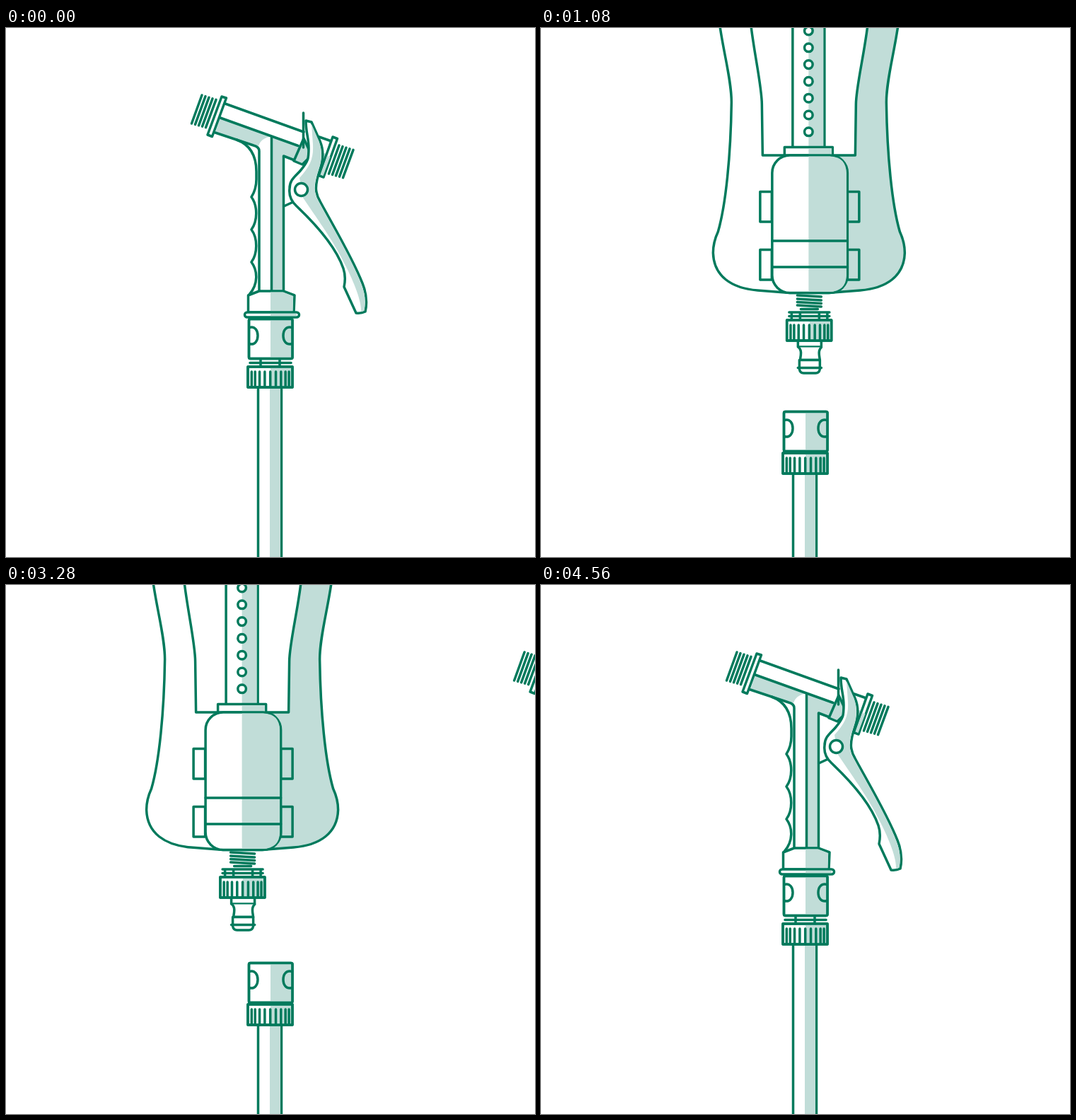
Write an HTML page that moves like this. It is 748 px wide and 748 px high and loops after 4760 ms.

```html
<!DOCTYPE html>
<html lang="en">
<head>
<meta charset="utf-8">
<title>Hose connector</title>
<style>
  html, body { margin: 0; width: 100%; height: 100%; overflow: hidden; background: #fff; }
  svg { display: block; width: 100vw; height: 100vh; }
  path, rect, circle { fill: none; stroke: #007a5c; stroke-width: 3.5; stroke-linecap: round; stroke-linejoin: round; }
  .white { fill: #fff; }
  .tint { fill: #c1ddd8; stroke: none; }
  .shaded { fill: #c1ddd8; }
</style>
</head>
<body>
<svg viewBox="0 0 748 748">
  <defs>
    <g id="plug">
      <path class="white" d="M357 409H390V418.500H357Z"/>
      <path class="white" d="M358 419Q362 423 361 430L360 437H388L387 430Q386 423 390 419"/>
      <path class="white" d="M359 437H388V450Q387 455.500 382 455.500H365Q360 455.500 359 450Z"/>
      <path d="M357 448H390" stroke-width="5"/>
    </g>
    <g id="nut">
      <rect class="white" x="342" y="479" width="63" height="29"/>
      <path class="tint" d="M374 480.500H403V506.500H374Z"/>
      <path class="teeth"/>
      <rect x="342" y="479" width="63" height="29"/>
    </g>
  </defs>

  <g id="sprinkler">
    <path class="tint" d="M498 0C492 40 482 75 482 105C483 180 490 250 501 288Q508 303 508 318C507 351 482 368 445 371L400 375H372V180H438L439 108C440 85 450 40 455 0Z"/>
    <path d="M247 0C253 40 263 75 263 105C262 180 255 250 244 288Q237 303 237 318C238 351 263 368 300 371L345 374.500H400L445 371C482 368 507 351 508 318Q508 303 501 288C490 250 483 180 482 105C482 75 492 40 498 0"/>
    <path d="M291 0C296 40 306 85 306 108L307 180H438L439 108C439 85 450 40 455 0"/>
    <path class="white" d="M349.500 -5H394.500V170H349.500Z"/>
    <path class="tint" d="M372 -5H393V170H372Z"/>
    <g id="holes"></g>
    <path class="white" d="M338 168.500H406V180H338Z"/>
    <path class="tint" d="M372 170H404.500V180H372Z"/>
    <path class="white" d="M303.500 231.500H320V274H303.500ZM303.500 313.500H320V356H303.500Z"/>
    <path class="shaded" d="M427 231.500H443.500V274H427ZM427 313.500H443.500V356H427Z"/>
    <rect class="white" x="320.500" y="180" width="106.500" height="194.500" rx="25"/>
    <path class="tint" d="M372 181.500H402Q425 182 425.500 205V350Q425 372 402 373H372Z"/>
    <path d="M320.500 301H427M320.500 338H427"/>
    <path d="M356 378L390 380M356 383L390 385M356 387.500L390 389.500M356 392L390 394M361 397.500H385" stroke-width="3.200"/>
    <path d="M344.500 402H401.500M344.500 407.500H401.500M348 402V412M360 402V412M387 402V412M398.500 402V412" stroke-width="3"/>
    <use href="#plug" y="32.500"/>
    <use href="#nut" x="-.7" y="-66"/>
  </g>

  <g id="gun">
    <path class="tint" d="M303 127L416 168L407 188L392 181V372H375V153Q360 156 357 167L296 148Z"/>
    <path d="M310 107L421 147M303 127L413 166.500M296 148L350 166Q358 168 358 174V372M375.500 153V372M392.500 372V181L408 187"/>
    <path d="M326 158C348 166 354 185 354 203V214C354 224 352 231 347 239C356 251 356 273 347 285C356 297 356 319 347 331C356 343 357 362 344 377"/>
    <path class="white" d="M305 97L311.500 99L291.500 153.500L285 151Z"/>
    <path class="threads" transform="translate(277 95)"/>
    <path class="threads" transform="translate(471 166)"/>
    <path class="white" d="M440 153L460 160L444 209L434 205Z"/>
    <path class="tint" d="M446 176L454 178L444 208L434 205Z"/>
    <path class="shaded" d="M421 156L407 188L419 193L432 180Z"/>
    <path class="white" d="M462 154L468.500 156.500L449 211L442.500 208.500Z"/>
    <path class="tint" d="M454 181L458.500 182L448.500 209L444.500 207.500Z"/>
    <path d="M393 252L406 246"/>
    <path class="white" d="M424 131L432 133L444 160C449 172 449 186 444 200C440 212 437 224 439 232C440 238 441 240 444 245C460 275 490 325 504 361C510 376 511 388 508 401Q502 404 495 403L478 366Q481 352 477 340C465 305 430 270 411 252C402 244 400 235 401 227C401 215 408 211 416 202C428 188 428 184 428 170C428 155 424 148 424 131Z"/>
    <path class="tint" d="M432 136L442.500 160C447 172 447 186 442 200C438 212 435 224 437 232C438 238 439 240 442 245C458 275 488 325 502 361C508 376 509 388 506 400L502 401C503 385 490 355 478 332C465 305 447 280 420 240L415 212C430 195 435 185 434 165Z"/>
    <path d="M420.500 120V169" stroke-width="5"/>
    <circle class="white" cx="417.500" cy="228.500" r="9"/>
    <path class="white" d="M342.500 402V378L358 372H392L408 378L407 402Z"/>
    <path class="tint" d="M374 373.500H392L406 379L405.500 401H374Z"/>
    <use href="#plug"/>
    <rect class="white" x="337.500" y="402" width="77" height="7" rx="3.500"/>
    <path class="tint" d="M374 403.700H411V407.300H374Z"/>
  </g>

  <g id="connector">
    <path class="white" d="M356.500 508H389.500V900H356.500Z"/>
    <path class="tint" d="M373 509H388V900H373Z"/>
    <path class="white" d="M360 460H387V479H360Z"/>
    <path d="M345 473.500H403"/>
    <use href="#nut"/>
    <g id="sleeve">
      <rect class="white" x="343.500" y="411.500" width="61.500" height="56" rx="2"/>
      <path class="tint" d="M374 413.200H403.300V465.800H374Z"/>
      <path d="M344 423.500C352 421 356 428 356 435S352 449 344 446.500M404.500 423.500C396 421 392 428 392 435S396 449 404.500 446.500"/>
      <rect x="343.500" y="411.500" width="61.500" height="56" rx="2"/>
    </g>
  </g>
</svg>
<script>
  const LOOP = 4760, STEP = 40;
  const find = id => document.getElementById(id);
  const range = (n, f) => Array.from({ length: n }, (_, i) => f(i)).join('');
  const setPath = (selector, d) =>
    document.querySelectorAll(selector).forEach(path => path.setAttribute('d', d));

  setPath('.teeth', range(9, i => `M${373.7 + 31 * Math.sin((i - 4) * 0.255)} 486V507`));
  setPath('.threads', range(5, i => `M${i * 5} ${i * 1.6}l-14.500 ${40 - i * 0.2}`));
  find('holes').innerHTML = range(7, i =>
    `<circle class="white" cx="372" cy="${4 + i * 23.8}" r="5.800"/>`);

  const easeIn = u => u * u;
  const easeInOut = u => u < 0.5 ? 4 * u ** 3 : 1 - 4 * (1 - u) ** 3;
  const ramp = (t, start, length, ease) =>
    ease(Math.min(1, Math.max(0, (t - start) / length)));
  const move = (id, x, y) => find(id).setAttribute('transform', `translate(${x} ${y})`);

  function draw(time) {
    const t = Math.floor(time % LOOP / STEP) * STEP;
    const swapOut = ramp(t, 655, 495, easeInOut);
    const swapBack = ramp(t, 3152, 495, easeInOut);

    move('gun', t < 2400 ? -570 * swapOut : 490 * (1 - swapBack), 0);
    move('sprinkler', 561 * (1 - swapOut) - 555 * swapBack, 0);

    const drop = 122 * ramp(t, 310, 430, easeIn) + 82 * ramp(t, 2790, 430, easeIn);
    const rise = 90 * ramp(t, 1252, 568, easeIn) + 114 * ramp(t, 3760, 568, easeIn);
    move('connector', 0, drop - rise);

    const unlock = ramp(t, 100, 200, easeInOut) + ramp(t, 2610, 180, easeInOut);
    const lock = ramp(t, 2030, 240, easeInOut) + ramp(t, 4320, 240, easeInOut);
    move('sleeve', 0, 9 * (unlock - lock));
  }

  const begin = performance.now();
  function tick() {
    draw(performance.now() - begin);
    requestAnimationFrame(tick);
  }
  tick();
</script>
</body>
</html>
```
